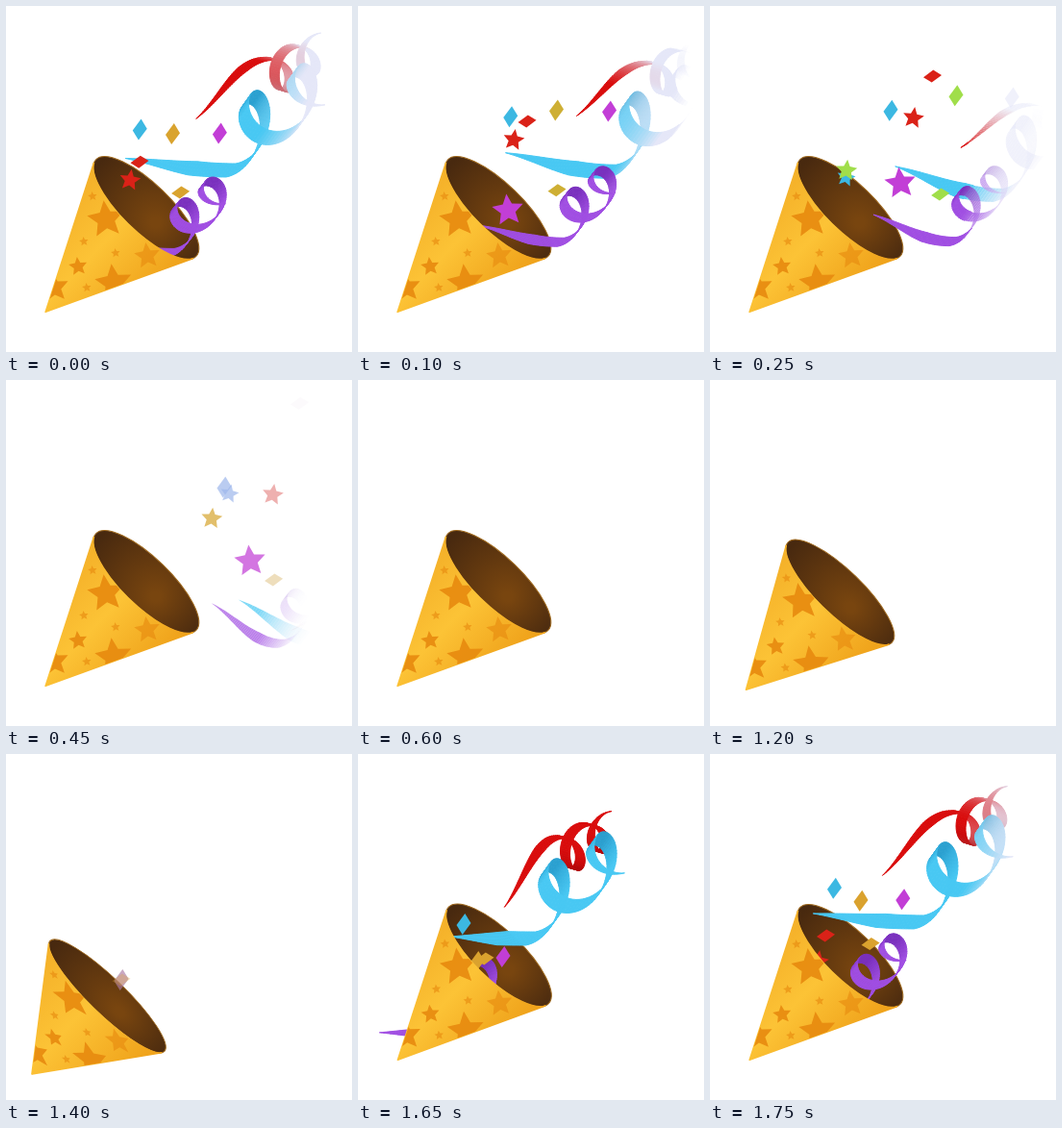
These frames come from a looping animation (360 by 360 pixels, 1800 ms). An HTML page with a canvas:

```html
<!DOCTYPE html>
<html lang="en">
<head>
<meta charset="utf-8">
<title>Party popper</title>
<style>
  html, body { margin: 0; width: 100%; height: 100%; overflow: hidden; background: #fff; }
  canvas { display: block; width: 360px; height: 360px; }
</style>
</head>
<body>
<canvas id="stage" width="360" height="360"></canvas>
<script>
const ctx = document.getElementById('stage').getContext('2d');
const LOOP = 1800, STEP = 50, BURST = 1400, LIFE = 1000, OUT = 250;
const TAU = Math.PI * 2;
const HOME = [120, 235];

const clamp = (v, lo = 0, hi = 1) => Math.min(hi, Math.max(lo, v));
const ramp = (v, a, b) => clamp((v - a) / (b - a));
const ease = v => v * v * (3 - 2 * v);
const mix = (a, b, k) => a.map((v, i) => v + (b[i] - v) * k);
const rgb = c => `rgb(${c.map(Math.round).join(',')})`;

// Everything turns pale, then clear, on its way to the right edge.
const PALE = [229, 231, 248];
const paleness = (x, T) => ramp(x, 262, 312) * ramp(T, OUT, 350);
const opacity = (x, T) => (1 - paleness(x, T) * ramp(T, 500, 850)) * ramp(x, 342, 328) *
                          ramp(T, LIFE, 790) * clamp(.3 + T / 120);

function tracePoly(pts) {
  ctx.beginPath();
  for (const p of pts) ctx.lineTo(...p);
  ctx.closePath();
}

function star(x, y, r, turn = 0, inner = .47) {
  const pts = [];
  for (let i = 0; i < 10; i++) {
    const a = turn + i * TAU / 10 - TAU / 4, l = i % 2 ? r * inner : r;
    pts.push([x + Math.cos(a) * l, y + Math.sin(a) * l]);
  }
  tracePoly(pts);
}

function diamond(x, y, w, h) {
  const lean = .12;
  tracePoly([[x + h * lean, y - h], [x + w, y - w * lean], [x - h * lean, y + h], [x - w, y + w * lean]]);
}

// ---- cone: x runs from the tip to the mouth ----
const AXIS = -46 * Math.PI / 180, TIP = [39.8, 319.8];
const RIM = 152.5, RX = 25, RY = 72.5, EDGE = Math.acos(-RX / RIM);
const SPOTS = [[104, 222, 20], [112, 288, 20], [147, 260, 14], [75, 271, 10],
               [50, 293, 16], [90, 198, 5], [81, 245, 5], [114, 257, 5], [84, 293, 5]];

function squash(t) {
  const s = t - BURST;
  return s < 0 ? ease(ramp(s, -300, 0)) : Math.exp(-s / 60) * Math.cos(s / 80);
}

function inCone(k, paint) {
  ctx.save();
  ctx.translate(...TIP);
  ctx.rotate(AXIS);
  ctx.translate(-20 * k, 0);
  ctx.scale(1 - .25 * k, 1 + .14 * k);
  paint();
  ctx.restore();
}

function mouth() {
  const g = ctx.createRadialGradient(RIM - 4, 18, 5, RIM, 5, 72);
  g.addColorStop(0, '#78450f');
  g.addColorStop(1, '#48290f');
  ctx.beginPath();
  ctx.ellipse(RIM, 0, RX, RY, 0, 0, TAU);
  ctx.fillStyle = g;
  ctx.fill();
  ctx.strokeStyle = '#a06a1e';
  ctx.stroke();
}

function body() {
  const g = ctx.createLinearGradient(60, -62, 60, 62);
  g.addColorStop(0, '#f5b22a');
  g.addColorStop(.45, '#fcc336');
  g.addColorStop(1, '#f0a41c');
  ctx.beginPath();
  ctx.moveTo(2, 0);
  ctx.ellipse(RIM, 0, RX, RY, 0, -EDGE, EDGE, true);
  ctx.closePath();
  ctx.fillStyle = ctx.strokeStyle = g;
  ctx.lineJoin = 'round';
  ctx.lineWidth = 1.6;
  ctx.fill();
  ctx.stroke();
  ctx.clip();
  ctx.rotate(-AXIS);
  ctx.translate(-TIP[0], -TIP[1]);
  ctx.fillStyle = '#e88d10';
  for (const [x, y, r] of SPOTS) {
    ctx.globalAlpha = r < 6 || r === 14 ? .65 : .95;
    star(x, y, r, -.12);
    ctx.fill();
  }
}

// ---- streamers: a trailing tail, then two turns of a coil ----
// x0, vx, drag: sideways flight; top, peak, g: height and time of the peak, gravity
const STREAMERS = [
  { color: [217, 12, 12], dark: [178, 6, 8], x0: 19, vx: 374, drag: 350, top: 54, peak: 430, g: .001,
    tail: [-76, 73], drift: [54, -31], rx: 14, ry: 21, side: -1, pen: [10, 3] },
  { color: [72, 200, 243], dark: [42, 160, 208], x0: 52, vx: 374, drag: 600, top: 170, peak: 440, g: .00061,
    tail: [-110, -2], drift: [98, -62], rx: 22, ry: 31, side: 1, pen: [10, -14] },
  { color: [160, 78, 226], dark: [122, 48, 190], x0: -167, vx: 497, drag: 350, top: 243, peak: 580, g: .00043,
    tail: [-85, 0], drift: [57, -47], rx: 18, ry: 21, side: 1, pen: [7, -9] },
];

function streamerPath(r, T) {
  const grow = clamp(.12 + T / 280);
  const flight = [r.x0 + r.vx * (1 - Math.exp(-T / r.drag)), r.top + r.g * (T - r.peak) ** 2];
  const [x, y] = mix(HOME, flight, ramp(T, 0, OUT));
  const dx = r.tail[0] * Math.min(grow, T / 330) * (1 - .15 * ramp(T, 600, 850));
  const dy = r.tail[1] * grow - .07 * Math.max(0, T - OUT);
  const pts = [], TAIL = 40, COIL = 110;
  for (let i = 0; i < TAIL; i++) {
    const s = i / TAIL, q = 1 - s;
    const a = q * q * q, b = 3 * q * q * s, c = 3 * q * s * s;
    pts.push([x + dx * (a + b * .65 + c * .42), y + dy * (a + b * .65)]);
  }
  for (let i = 0; i <= COIL; i++) {
    const s = i / COIL, a = s * 2 * TAU, ry = r.ry * r.side * (1 - .2 * s);
    pts.push([x + grow * (r.drift[0] * s + r.rx * Math.sin(a)),
              y + grow * (r.drift[1] * s + ry * Math.cos(a) - r.ry * r.side)]);
  }
  return pts;
}

function drawStreamer(r, T) {
  const pts = streamerPath(r, T), n = pts.length - 1;
  const edge = (i, sign) => {
    const s = i / n, w = sign / 2 * clamp(T / OUT) * Math.min(1, s / .18, (1 - s) / .14);
    return [pts[i][0] + r.pen[0] * w, pts[i][1] + r.pen[1] * w];
  };
  ctx.lineWidth = 1;
  for (let i = 0; i < n; i++) {
    const [x, y] = pts[i], [nx, ny] = pts[i + 1];
    const back = clamp((x - nx) / (Math.hypot(nx - x, ny - y) || 1) + .15);
    const a = opacity(x, T);
    ctx.globalAlpha = a;
    ctx.fillStyle = ctx.strokeStyle = rgb(mix(mix(r.color, r.dark, back), PALE, paleness(x, T)));
    tracePoly([edge(i, 1), edge(i + 1, 1), edge(i + 1, -1), edge(i, -1)]);
    ctx.fill();
    if (a > .95) ctx.stroke();
  }
}

// ---- confetti: a kick that dies away plus a steady drift ----
const RED = () => [218, 34, 24];
const PINK = () => [194, 62, 214];
const BLUE = T => mix([60, 184, 226], [158, 184, 236], ramp(T, 650, 850));
const GOLD = T => mix([218, 162, 46], [160, 222, 74], Math.exp(-(((T - 650) / 120) ** 2)));
const TALL = [7.5, 11], FLAT = [9.5, 6.5];

const CONFETTI = [
  { shape: diamond, color: BLUE, size: TALL, born: 250, from: [110, 177], drift: [.195, .05], kick: [0, -99] },
  { shape: diamond, color: GOLD, size: TALL, born: 250, from: [124, 216], drift: [.33, .05], kick: [0, -160] },
  { shape: diamond, color: PINK, size: TALL, born: 250, from: [151, 211], drift: [.31, .05], kick: [44, -152] },
  { shape: diamond, color: RED, size: FLAT, born: 300, from: [102, 221], drift: [.37, -.2], kick: [0, -91] },
  { shape: diamond, color: GOLD, size: FLAT, born: 250, from: [132, 213], drift: [.18, .08], kick: [40, -55] },
  { shape: star, color: RED, size: [11.5, .15], born: 300, from: [96, 263], drift: [.33, .12], kick: [0, -220] },
  { shape: star, color: BLUE, size: [10, .2], born: 550, from: [96, 251], drift: [.455, .05], kick: [0, -182] },
  { shape: star, color: GOLD, size: [11.5, .1], born: 550, from: [106, 207], drift: [.36, .05], kick: [0, -96] },
  { shape: star, color: PINK, size: [17, -.1], born: 400, from: [128, 264], drift: [.28, .15], kick: [0, -156] },
];

function drawPiece(p, T) {
  if (T < p.born && p.born > OUT) return;
  const age = Math.max(0, T - p.born), spent = 1 - Math.exp(-age / 180);
  const spot = p.from.map((v, i) => v + p.drift[i] * age + p.kick[i] * spent);
  const [x, y] = mix(HOME, spot, ramp(T, 0, OUT));
  ctx.globalAlpha = opacity(x, T);
  ctx.fillStyle = rgb(mix(p.color(T), PALE, paleness(x, T)));
  p.shape(x, y, ...p.size);
  ctx.fill();
}

function draw(t) {
  const k = squash(t), T = (t - BURST + LOOP) % LOOP;
  ctx.clearRect(0, 0, 360, 360);
  inCone(k, mouth);
  if (T < LIFE) {
    for (const r of STREAMERS) drawStreamer(r, T);
    for (const p of CONFETTI) drawPiece(p, T);
    ctx.globalAlpha = 1;
  }
  inCone(k, body);
}

const start = performance.now();
function tick() {
  const t = (performance.now() - start) % LOOP;
  draw(Math.floor(t / STEP) * STEP);
  requestAnimationFrame(tick);
}
tick();
</script>
</body>
</html>
```
